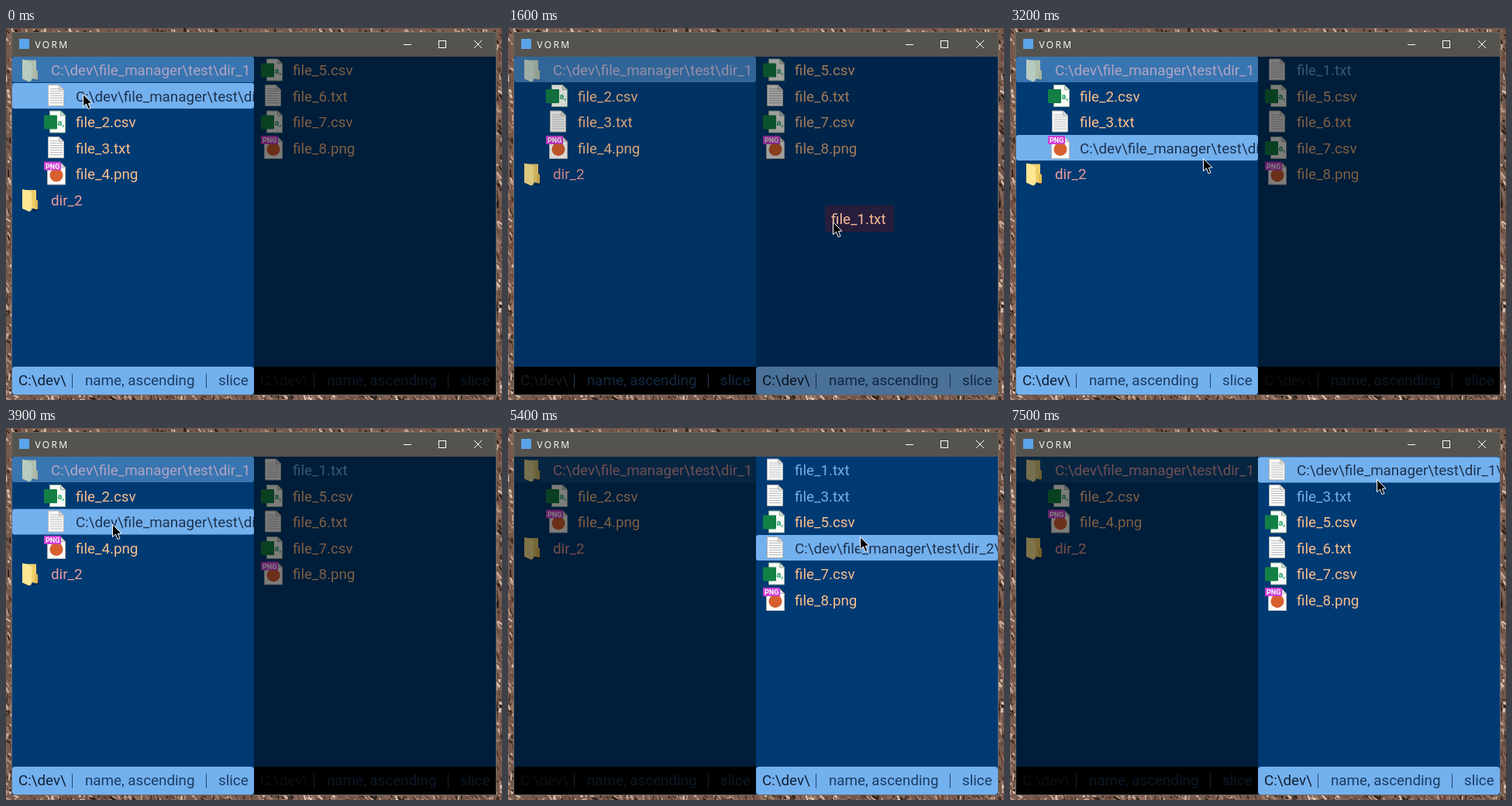
Write an HTML page with a canvas that moves like this. It is 640 px wide and 480 px high and loops after 8000 ms.

```html
<!DOCTYPE html>
<html lang="en">
<head>
<meta charset="utf-8">
<title>File manager</title>
<style>
html, body { margin: 0; width: 100%; height: 100%; overflow: hidden; background: #6b5548; }
canvas { display: block; width: 640px; height: 480px; }
</style>
</head>
<body>
<canvas id="stage" width="640" height="480"></canvas>
<script>
const ctx = document.getElementById('stage').getContext('2d');
const LOOP = 8000, STEP = 100, LAST = 7500;
const ROW = 33.5, TOP = 37, PANE_W = 312, BAR_Y = 437;
const FONT = '18.8px Roboto, "Open Sans", sans-serif';
const BLUE = '#73b0ee', PEACH = '#f9bf8b', PINK = '#ee9c9c', INK = '#1d3350';
const ROOT = 'C:\\dev\\file_manager\\test\\';

// time, x, y of the pointer
const PATH = [
  [0, 99, 85], [700, 104, 86], [1500, 416, 248], [1600, 419, 250],
  [2000, 425, 252], [2600, 366, 214], [2800, 363, 215], [3600, 134, 121],
  [3900, 137, 124], [4000, 138, 124], [4500, 400, 280], [4800, 402, 282],
  [5300, 452, 148], [5400, 454, 140], [6000, 456, 128], [6600, 462, 118],
  [7200, 471, 114], [7500, 473, 66]
];
const DRAGS = [
  { file: 'file_1.txt', from: 900, to: 2100, dx: -10, dy: -21 },
  { file: 'file_3.txt', from: 4100, to: 4900, dx: -24, dy: -25 }
];

function pointer(t) {
  let i = 0;
  while (i < PATH.length - 2 && t >= PATH[i + 1][0]) i++;
  const [t0, x0, y0] = PATH[i], [t1, x1, y1] = PATH[i + 1];
  const u = Math.min(1, (t - t0) / (t1 - t0)), e = u * u * (3 - 2 * u);
  return { x: x0 + (x1 - x0) * e, y: y0 + (y1 - y0) * e };
}

function rect(x, y, w, h, fill, r = 0) {
  ctx.fillStyle = fill;
  ctx.beginPath();
  ctx.roundRect(x, y, w, h, r);
  ctx.fill();
}

function poly(points, fill, stroke) {
  ctx.beginPath();
  points.forEach(([x, y]) => ctx.lineTo(x, y));
  ctx.closePath();
  if (fill) { ctx.fillStyle = fill; ctx.fill(); }
  if (stroke) { ctx.strokeStyle = stroke; ctx.lineWidth = 1; ctx.stroke(); }
}

function line(x0, y0, x1, y1, color) {
  ctx.strokeStyle = color;
  ctx.lineWidth = 1;
  ctx.beginPath();
  ctx.moveTo(x0, y0);
  ctx.lineTo(x1, y1);
  ctx.stroke();
}

function text(s, x, y, color, font = FONT) {
  ctx.font = font;
  ctx.fillStyle = color;
  ctx.fillText(s, x, y);
}

function page(x, y, w, h, edge) {
  poly([[x, y], [x + w - 6, y], [x + w, y + 6], [x + w, y + h], [x, y + h]], '#fafaf8', edge);
  poly([[x + w - 6, y], [x + w - 6, y + 6], [x + w, y + 6]], '#dcdcda', edge);
}

// Icons are drawn in a 32 px wide cell starting at 0,0
const icons = {
  txt() {
    page(6.5, 3.5, 20, 27, '#b4b4b0');
    for (let y = 8.5; y < 29; y += 3) line(9, y, y < 10 ? 20 : 25, y, '#b9bcc0');
  },
  csv() {
    page(8.5, 3.5, 20, 28, '#8fb09a');
    rect(1, 9, 17, 18, '#128045', 1);
    text('a,', 18.5, 22, '#23a566', 'bold 11px Roboto, sans-serif');
  },
  png() {
    page(5.5, 3.5, 23, 28, '#b9b4b4');
    ctx.fillStyle = '#d8602f';
    ctx.beginPath();
    ctx.arc(17, 19.5, 8.5, 0, 7);
    ctx.fill();
    rect(1, 2, 22, 11, '#d03fd6', 1);
    text('PNG', 3, 11, '#fff', 'bold 9px Roboto, sans-serif');
  },
  dir() {
    poly([[22, 29], [26, 29], [26, 31], [17, 33]], 'rgba(0,0,0,.45)');
    rect(6, 5, 17, 24, '#f0cf6c', 1);
    rect(21, 18, 4, 12, '#e2bc55', 1);
    poly([[5, 4], [14, 6], [17, 9], [17, 31], [14, 33], [5, 29]], '#ffe793');
  }
};

function icon(kind, x, y) {
  ctx.save();
  ctx.translate(x, y);
  icons[kind]();
  ctx.restore();
}

function lists(t) {
  const gone = f => DRAGS.some(d => d.file === f && t >= d.from);
  const landed = f => DRAGS.some(d => d.file === f && t >= d.to);
  const file = (name, dir, indent, color = PEACH) =>
    ({ name, indent, color, kind: name.slice(-3), full: ROOT + dir + '\\' + name });
  const folder = (name, open) =>
    ({ name: open ? ROOT + name : name, open, indent: 0, color: PINK, kind: 'dir', full: ROOT + name });
  const inside = ['file_1.txt', 'file_2.csv', 'file_3.txt', 'file_4.png'];
  const left = [
    folder('dir_1', true),
    ...inside.filter(f => !gone(f)).map(f => file(f, 'dir_1', 32)),
    folder('dir_2')
  ];
  const right = [
    ...inside.filter(landed).map(f => file(f, 'dir_1', 0, BLUE)),
    ...['file_5.csv', 'file_6.txt', 'file_7.csv', 'file_8.png'].map(f => file(f, 'dir_2', 0))
  ];
  return [left, right];
}

function statusBar(x, active) {
  rect(x, BAR_Y, PANE_W, 36, active ? BLUE : '#000', active ? 4 : 0);
  const main = active ? '#132133' : '#1a1d22';
  const soft = active ? '#1b3c63' : '#15304f';
  text('C:\\dev\\', x + 8, 461, main);
  text('name, ascending', x + 94, 461, soft);
  text('slice', x + 266, 461, soft);
  for (const dx of [77.5, 250.5]) line(x + dx, 446, x + dx, 465, active ? '#23466d' : '#2c425c');
}

function pane(x, rows, { dim, focus, active, hover }) {
  ctx.save();
  ctx.beginPath();
  ctx.rect(x, TOP, PANE_W, 436);
  ctx.clip();
  rect(x, TOP, PANE_W, 436, '#003a73');
  rows.forEach((r, i) => {
    const y = TOP + i * ROW, hot = i === hover;
    if (hot) rect(x, y + .5, PANE_W, 33, BLUE, 3);
    icon(r.kind, x + 8 + r.indent, y - .5);
    text(hot ? r.full : r.name, x + 50 + r.indent, y + 24, hot ? INK : r.color);
    if (r.open && !hot) {
      ctx.globalAlpha = focus ? .5 : .13;
      rect(x, y, PANE_W, 33, BLUE, 3);
      ctx.globalAlpha = 1;
    }
  });
  statusBar(x, active);
  if (dim) rect(x, TOP, PANE_W, 436, `rgba(0,0,0,${dim})`);
  ctx.restore();
}

function titleBar() {
  rect(8, 6, 624, 31, '#55534e');
  rect(17, 14, 13, 13, '#5ba4ea');
  ctx.letterSpacing = '2.3px';
  text('VORM', 37.5, 25.5, '#fff', '12px "Open Sans", sans-serif');
  ctx.letterSpacing = '0px';
  line(513, 21.5, 523, 21.5, '#fff');
  ctx.strokeRect(558.5, 16.5, 9, 9);
  line(604, 16, 614, 26, '#fff');
  line(614, 16, 604, 26, '#fff');
}

function arrow({ x, y }) {
  ctx.save();
  ctx.translate(Math.round(x) + .5, Math.round(y) + .5);
  poly([[0, 0], [0, 16], [4, 12.5], [6.5, 19], [9.5, 18], [6.8, 11.8], [11.5, 11.5]], '#000', '#fff');
  ctx.restore();
}

// Bark-like backdrop from seeded slivers
const backdrop = (() => {
  const c = document.createElement('canvas');
  c.width = 640;
  c.height = 480;
  const g = c.getContext('2d');
  let seed = 17;
  const rnd = () => (seed = seed * 16807 % 2147483647) / 2147483647;
  const tones = ['#2e211c', '#4f3a30', '#775a4b', '#9c7865', '#c3a18c', '#dcc4b2', '#6a4438', '#8b6a60'];
  g.fillStyle = '#755a4c';
  g.fillRect(0, 0, 640, 480);
  for (let i = 0; i < 1500; i++) {
    const along = rnd(), off = rnd() * 9, side = i % 7;
    const x = side < 4 ? along * 640 : side < 5 ? off : side < 6 ? 640 - off : along * 640;
    const y = side < 2 ? off : side < 4 ? 480 - off : rnd() * 480;
    g.save();
    g.translate(x, y);
    g.rotate(.5 + rnd() * 1.2);
    g.fillStyle = tones[Math.floor(rnd() * tones.length)];
    g.fillRect(0, 0, 3 + rnd() * 8, 1 + rnd() * 2.2);
    g.restore();
  }
  return c;
})();

function draw(t) {
  const p = pointer(t);
  const drag = DRAGS.find(d => t >= d.from && t < d.to);
  const onRight = p.x >= 320;
  const data = lists(t);
  const row = Math.floor((p.y - TOP) / ROW);

  ctx.drawImage(backdrop, 0, 0);
  rect(7, 5, 626, 469, '#6a6865');
  titleBar();
  data.forEach((rows, i) => {
    const active = onRight === (i === 1);
    const dim = drag ? (i === 0 ? .14 : onRight ? .36 : .5) : active ? 0 : .5;
    pane(8 + i * PANE_W, rows, {
      dim, active,
      focus: drag ? i === 0 : active,
      hover: active && !drag ? row : -1
    });
  });
  if (drag) {
    const x = Math.round(p.x) + drag.dx, y = Math.round(p.y) + drag.dy;
    rect(x, y, 89, 34, '#271d3c', 3);
    text(drag.file, x + 8, y + 23.5, '#f7bd96');
  }
  arrow(p);
}

function tick(now) {
  const t = now % LOOP;
  draw(Math.min(LAST, Math.floor(t / STEP) * STEP));
  requestAnimationFrame(tick);
}
draw(0);
requestAnimationFrame(tick);
</script>
</body>
</html>
```
